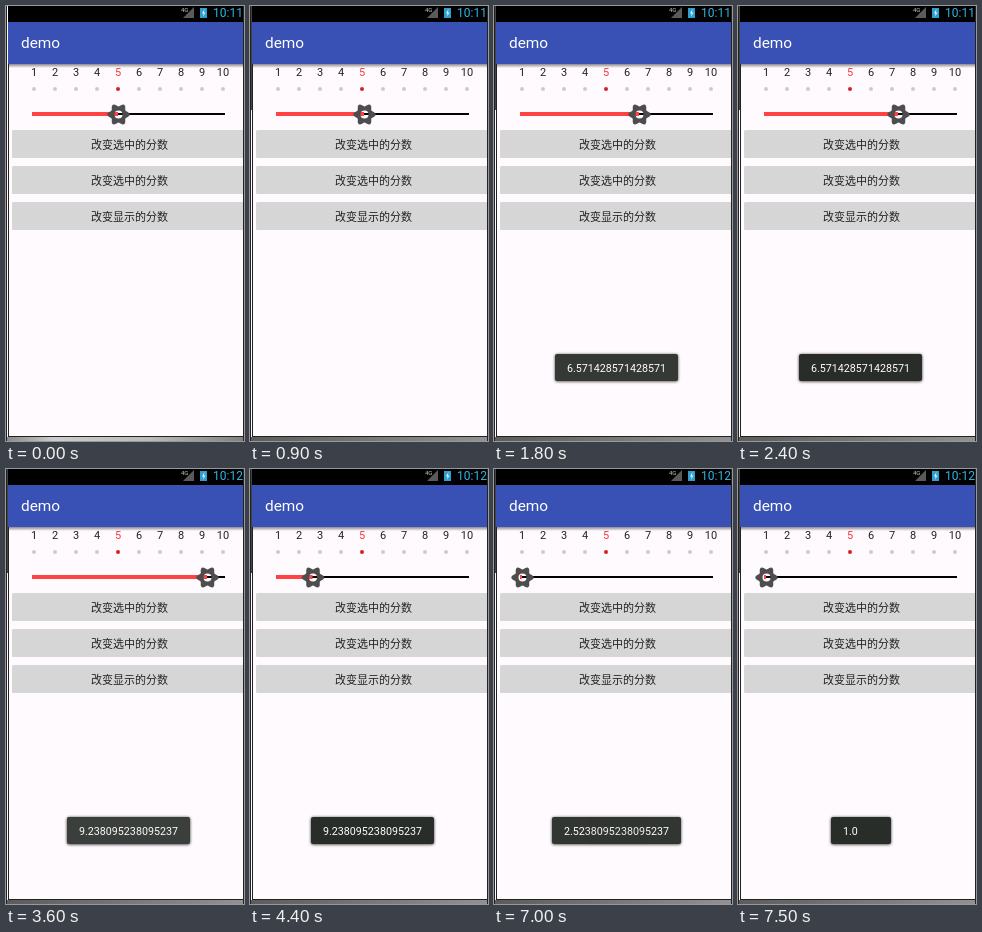
Animation of 238 by 435 pixels, one loop 8000 ms. Source, as an HTML page:

```html
<!DOCTYPE html>
<html lang="zh-CN">
<head>
<meta charset="utf-8">
<title>demo</title>
<style>
html, body { margin: 0; width: 100%; height: 100%; overflow: hidden; background: #fffafe; }
svg { display: block; width: 238px; height: 435px; font-family: Roboto, sans-serif; }
.cjk { font-family: "Noto Sans CJK SC", "Noto Sans CJK", sans-serif; font-size: 11px; }
</style>
</head>
<body>
<svg id="stage" viewBox="0 0 238 435" xmlns="http://www.w3.org/2000/svg">
  <defs>
    <linearGradient id="drop" x1="0" y1="0" x2="0" y2="1">
      <stop offset="0" stop-color="#000" stop-opacity=".45"/>
      <stop offset="1" stop-color="#000" stop-opacity="0"/>
    </linearGradient>
    <linearGradient id="light">
      <stop offset="0" stop-color="#888"/>
      <stop offset=".2" stop-color="#ccc"/>
      <stop offset=".6" stop-color="#bbb"/>
      <stop offset="1" stop-color="#808080"/>
    </linearGradient>
    <linearGradient id="dark">
      <stop offset="0" stop-color="#5c5c5c"/>
      <stop offset="1" stop-color="#929292"/>
    </linearGradient>
    <filter id="blur" x="-10%" y="-40%" width="120%" height="180%">
      <feGaussianBlur stdDeviation="1.8"/>
    </filter>
  </defs>
  <rect width="238" height="435" fill="#fffafe"/>
  <rect x="2" width="236" height="16" fill="#000"/>
  <rect x="2" y="16" width="236" height="42" fill="#3950b4"/>
  <rect x="2" y="58" width="236" height="4" fill="url(#drop)"/>
  <rect x="2" y="58" width="1" height="372" fill="#222"/>

  <text x="175" y="6" font-size="6" fill="#ccc">4G</text>
  <path d="M177 12H188V1Z" fill="#5a5a5a"/>
  <path d="M194 2h7v10h-7z" fill="#2f9fd0"/>
  <path d="M198.5 3l-2.5 4.5h1.7l-.9 3.5 2.7-4.5h-1.6z" fill="#e8f8ff"/>
  <text id="clock" x="207" y="11" font-size="12" fill="#33b5e5"></text>
  <text x="15" y="42" font-size="15.4" fill="#fff">demo</text>

  <g id="scale" font-size="11" text-anchor="middle"></g>
  <rect x="26" y="107" width="193" height="2" fill="#000"/>
  <rect id="fill" x="26" y="106" height="4" fill="#ff4343"/>
  <path id="gear" fill="#4d4d4d" fill-rule="evenodd"/>
  <g id="buttons"></g>

  <rect x="2" y="430" width="236" height="1" fill="#222"/>
  <rect id="base" y="431" width="238" height="4"/>
  <rect id="side" x="1" width="1" height="104" fill="#444"/>
  <rect width="1" height="435" fill="#222"/>
  <rect x="237" width="1" height="435" fill="#222"/>
  <g id="toasts"></g>
</svg>
<script>
const LOOP = 8000, STEP = 100;
const $ = id => document.getElementById(id);

function add(parent, tag, attrs, text) {
  const el = document.createElementNS('http://www.w3.org/2000/svg', tag);
  for (const k in attrs) el.setAttribute(k, attrs[k]);
  if (text) el.textContent = text;
  parent.appendChild(el);
  return el;
}

for (let n = 1; n <= 10; n++) {
  const x = 7 + 21 * n, on = n === 5;
  add($('scale'), 'text', { x, y: 70, fill: on ? '#f23b3b' : '#222' }, String(n));
  add($('scale'), 'circle', { cx: x, cy: 83, r: 2, fill: on ? '#d32222' : '#ccc' });
}

// six rounded teeth around an open hub that shows the track
const rim = Array.from({ length: 72 }, (_, i) => {
  const a = i * Math.PI / 36, r = 9.6 + 1.6 * Math.cos(6 * a);
  return (r * Math.cos(a)).toFixed(2) + ' ' + (r * Math.sin(a)).toFixed(2);
});
$('gear').setAttribute('d', `M${rim.join('L')}ZM-4 0a4 4 0 1 0 8 0a4 4 0 1 0 -8 0Z`);

['改变选中的分数', '改变选中的分数', '改变显示的分数'].forEach((label, i) => {
  const y = 124 + 36 * i;
  add($('buttons'), 'rect', { x: 6, y, width: 235, height: 28, rx: 1.5, fill: '#d6d6d6' });
  add($('buttons'), 'text', { x: 123.5, y: y + 18.5, class: 'cjk', 'text-anchor': 'middle', fill: '#222' }, label);
});

// start, fade length, text, left edge, width
const toasts = [
  [1500, 500, '6.571428571428571', 61, 123],
  [3400, 400, '9.238095238095237', 61, 123],
  [5200, 400, '2.5238095238095237', 58, 129],
  [7000, 400, '1.0', 93, 60]
].map(([start, fade, text, x, width]) => {
  const el = add($('toasts'), 'g', { opacity: 0 });
  add(el, 'rect', { x, y: 348.5, width, height: 27, rx: 2, fill: '#000', opacity: 0.8, filter: 'url(#blur)' });
  add(el, 'rect', { x, y: 348, width, height: 27, rx: 2, fill: '#282d29' });
  add(el, 'text', { x: x + 12, y: 366, 'font-size': 10.7, fill: '#fff' }, text);
  return { el, start, fade };
});

// time, gear centre
const path = [
  [0, 112], [800, 112], [900, 114], [1400, 145], [2300, 145], [2400, 160],
  [2900, 201], [3900, 201], [4400, 62.5], [4500, 62.5], [4600, 60],
  [5700, 60], [6000, 28], [LOOP, 28]
];

function gearX(t) {
  const i = path.findIndex(p => p[0] > t);
  const [t0, x0] = path[i - 1], [t1, x1] = path[i];
  return x0 + (x1 - x0) * (t - t0) / (t1 - t0);
}

function progress(toast, t) {
  if (!toast || t < toast.start) return 0;
  return Math.min(1, (t - toast.start + 10) / (toast.fade + 10));
}

function draw(now) {
  const t = Math.floor((now % LOOP) / STEP) * STEP;
  const x = gearX(t);
  $('gear').setAttribute('transform', `translate(${x + 0.5} 108.5)`);
  $('fill').setAttribute('width', x - 26);
  $('clock').textContent = t < 3000 ? '10:11' : '10:12';
  $('base').setAttribute('fill', t < 900 ? 'url(#light)' : 'url(#dark)');
  $('side').setAttribute('opacity', t < 900 ? 0 : 1);
  toasts.forEach((toast, i) => {
    const shown = 1 - (1 - progress(toast, t)) ** 3;
    const left = (1 - progress(toasts[i + 1], t)) ** 2;
    toast.el.setAttribute('opacity', shown * left);
  });
}

const begin = performance.now();
function tick() {
  draw(performance.now() - begin);
  requestAnimationFrame(tick);
}
tick();
</script>
</body>
</html>
```
